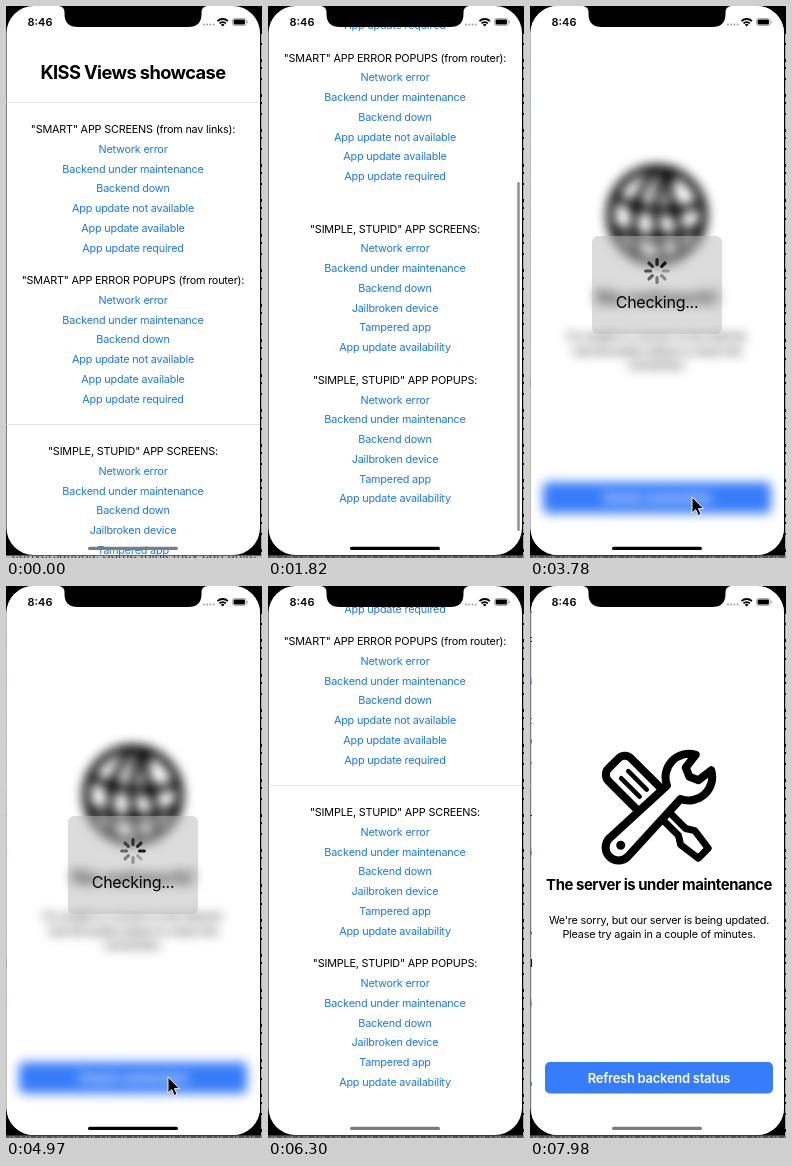
Animation of 256x552 px, one loop 8 s. Source, as an HTML page:

```html
<!DOCTYPE html>
<html lang="en">
<head>
<meta charset="utf-8">
<title>Views showcase</title>
<style>
html, body { margin: 0; width: 100%; height: 100%; overflow: hidden; background: #000; }
svg { display: block; width: 256px; height: 552px; }
text { font: 10.83px Inter, "Liberation Sans", sans-serif; letter-spacing: -.19px; text-anchor: middle; }
.link { fill: #1a78e2; }
.title { font-size: 18.3px; font-weight: 700; letter-spacing: -.6px; }
.big { font-size: 22px; font-weight: 700; letter-spacing: -.85px; }
.mid { font-size: 14.9px; font-weight: 700; letter-spacing: -.43px; }
.button { font-size: 13px; font-weight: 600; letter-spacing: -.27px; fill: #fff; }
.hud { font-size: 16px; letter-spacing: -.25px; }
.clock { font-size: 11px; font-weight: 600; letter-spacing: 0; }
.behind { font-size: 13px; fill: #444; }
.ink { fill: none; stroke: #000; stroke-width: 7.2; }
.tool { fill: #fff; stroke: #000; stroke-width: 8; stroke-linejoin: round; }
</style>
</head>
<body>
<svg viewBox="0 0 256 552">
  <defs>
    <clipPath id="screenClip"><rect x=".5" width="253.5" height="549" rx="27"/></clipPath>
    <clipPath id="globeClip"><circle cx="127" cy="209" r="48"/></clipPath>
    <clipPath id="stripClip"><rect y="549.5" width="256" height="3"/></clipPath>
    <filter id="blur" filterUnits="userSpaceOnUse" x="-20" y="120" width="300" height="420" color-interpolation-filters="sRGB">
      <feGaussianBlur id="blurAmount" stdDeviation="0"/>
    </filter>
  </defs>

  <rect width="256" height="552"/>
  <path d="M255.5 28V552" stroke="#aaa" stroke-dasharray="9 2 14 3 5 2"/>
  <g clip-path="url(#stripClip)">
    <rect id="strip" y="549" width="256" height="3"/>
    <text id="behind" class="behind" x="128" y="553">conversations. Some think they can unite</text>
    <path id="specks" d="M0 551H256" stroke="#333" stroke-dasharray="3 2 1 3 5 2"/>
  </g>

  <g clip-path="url(#screenClip)">
    <rect width="256" height="552" fill="#fff"/>
    <g id="list"><g id="dividers" stroke="#e6e6e8"><path d="M0 96.5H256M0 418.5H256"/></g></g>
    <rect id="bar" x="249.3" width="2.4" height="349" rx="1.2" fill="#8a8a8a"/>
    <rect id="dim" width="256" height="552"/>

    <g id="network">
      <rect width="256" height="552" fill="#fff"/>
      <g id="networkBody">
        <g clip-path="url(#globeClip)">
          <g class="ink" transform="translate(-6.5 0)">
            <path d="M84 184Q98 197 113 200Q132 206 151 204Q168 203 184 194"/>
            <path d="M84 219Q110 233 135 232Q162 231 182 217"/>
            <path d="M139 160Q118 176 113 200Q106 232 119 260"/>
            <path d="M146 160Q126 192 135 232Q137 246 142 260"/>
            <path d="M150 160Q142 184 151 204Q160 228 153 258"/>
          </g>
          <circle cx="106.5" cy="200" r="8"/>
          <circle cx="144.5" cy="204" r="8"/>
          <circle cx="128.5" cy="232" r="8"/>
        </g>
        <circle class="ink" cx="127" cy="209" r="46.5" style="stroke-width:8"/>
        <text class="big" x="127" y="299">No network!</text>
        <text x="127" y="334">I'm unable to connect to the Internet.</text>
        <text x="127" y="349">Use the button below to check the</text>
        <text x="127" y="363">connection.</text>
        <rect x="13" y="476" width="228" height="31.5" rx="5" fill="#377cf8"/>
        <text class="button" x="127" y="496.5">Check connection</text>
      </g>
      <g id="hud">
        <rect x="62" y="230" width="130" height="98" rx="6" fill="#b9b9b9" fill-opacity=".5"/>
        <g id="spinner" stroke="#111" stroke-width="3.2" stroke-linecap="round"/>
        <text class="hud" x="127" y="302">Checking...</text>
      </g>
    </g>

    <g id="service">
      <rect width="256" height="552" fill="#fff"/>
      <g transform="translate(126 222) rotate(45)">
        <path class="tool" d="M2-5H34L42-10L64-7V7L42 10L34 5H2Z" style="stroke-width:7"/>
        <rect class="tool" x="-63" y="-16" width="60" height="32" rx="9"/>
        <path d="M-47-5H-21M-47 5H-21" stroke="#000" stroke-width="4.6" stroke-linecap="round"/>
      </g>
      <g transform="translate(125.5 222.5) rotate(-45)">
        <path class="tool" d="M-55-13L23-9.6A23.500 23.500 0 0 1 65-11L49-9L45 0L49 9L65 11A23.500 23.500 0 0 1 23 9.6L-55 13A13 13 0 0 1-55-13Z"/>
        <circle cx="-52" r="4.5"/>
      </g>
      <text class="mid" x="127" y="304">The server is under maintenance</text>
      <text x="127" y="337.5">We're sorry, but our server is being updated.</text>
      <text x="127" y="352">Please try again in a couple of minutes.</text>
      <rect x="13" y="476" width="228" height="31.5" rx="5" fill="#377cf8"/>
      <text class="button" x="127" y="496.5">Refresh backend status</text>
    </g>

    <path d="M53 0Q58.500 1 58.500 6V8Q58.500 21 72 21H182Q195.500 21 195.500 8V6Q195.500 1 201 0Z"/>
    <text class="clock" x="34" y="20">8:46</text>
    <path d="M198 18.500H208" stroke="#999" stroke-width="1.800" stroke-linecap="round" stroke-dasharray="0 3.200"/>
    <g fill="none" stroke="#000" stroke-width="1.800">
      <path d="M211.500 15.200A7.300 7.300 0 0 1 221.900 15.200M213.500 17.400A4.500 4.500 0 0 1 219.900 17.400"/>
    </g>
    <path d="M216.700 20.500L214.900 18.700A2.500 2.500 0 0 1 218.500 18.700Z"/>
    <rect x="226.500" y="12.500" width="13.500" height="7" rx="2" fill="none" stroke="#999" stroke-width=".8"/>
    <rect x="227.600" y="13.600" width="11.300" height="4.800" rx="1"/>
    <path d="M241.200 14.800V17.200" stroke="#999" stroke-width="1"/>
    <rect id="home" x="82" y="540.800" width="90" height="3.200" rx="1.600"/>
  </g>

  <circle id="ring" r="13.500" fill="none" stroke="#222" stroke-width="1.500"/>
  <path id="cursor" transform="translate(162 491)" d="M0 0V16L3.700 12.600L6.300 18.500L9 17.300L6.400 11.600H11.500Z" stroke="#fff" stroke-width=".9"/>
</svg>

<script>
const LOOP = 8000, WIDTH = 254, STEP = 19.75, SCROLL_END = 219;
const PUSH = 2470, POP = 5658, PUSH_AGAIN = 7562;
const NS = "http://www.w3.org/2000/svg";
const $ = id => document.getElementById(id);
const set = (id, name, value) => $(id).setAttribute(name, value);
const show = (id, on) => set(id, "opacity", +on);
const clamp = x => Math.min(1, Math.max(0, x));
const ramp = (t, from, to) => clamp((t - from) / (to - from));
const within = (t, from, to) => t >= from && t < to;
const smooth = x => x * x * (3 - 2 * x);

// Remaining share of a critically damped spring.
const spring = (ms, rate = .0165) => ms <= 0 ? 1 : (1 + rate * ms) * Math.exp(-rate * ms);

function add(parent, tag, attrs, text = "") {
  const node = document.createElementNS(NS, tag);
  for (const key in attrs) node.setAttribute(key, attrs[key]);
  node.textContent = text;
  $(parent).append(node);
  return node;
}

function addGroup(y, heading, links) {
  add("list", "text", { x: 127, y: y + 4 }, heading);
  links.forEach((link, i) =>
    add("list", "text", { class: "link", x: 127, y: y + 23.9 + i * STEP }, link));
}

const common = ["Network error", "Backend under maintenance", "Backend down"];
const smart = [...common, "App update not available", "App update available", "App update required"];
const simple = [...common, "Jailbroken device", "Tampered app", "App update availability"];
add("list", "text", { class: "title", x: 127, y: 72.5 }, "KISS Views showcase");
addGroup(123, '"SMART" APP SCREENS (from nav links):', smart);
addGroup(274, '"SMART" APP ERROR POPUPS (from router):', smart);
addGroup(445, '"SIMPLE, STUPID" APP SCREENS:', simple);
addGroup(596.2, '"SIMPLE, STUPID" APP POPUPS:', simple);

const spokes = Array.from({ length: 8 }, (_, i) =>
  add("spinner", "path", { d: "M0-6.5V-11.3", transform: `translate(127 265) rotate(${i * 45})` }));

const taps = [
  { from: 2380, to: 2520, x: 135.5, y: 248 },
  { from: 3290, to: 3430, x: 164, y: 493 },
  { from: 7490, to: 7562, x: 135.5, y: 267 }
];

function scrollAt(t) {
  if (t < 1620) return 232 * smooth(ramp(t, 1190, 1620));
  return SCROLL_END + 13 * spring(t - 1620, .013);
}

function drawList(t, cover) {
  const scroll = t < 2200 ? scrollAt(t) : SCROLL_END;
  set("list", "transform", `translate(${-.3 * WIDTH * cover} ${-scroll})`);
  show("dividers", !within(t, 1260, 2520));
  set("bar", "y", 27 + 149 * Math.min(1, scroll / SCROLL_END));
  show("bar", ramp(t, 1190, 1260) * (1 - ramp(t, 2030, 2100)));
  set("dim", "opacity", .1 * Math.sqrt(cover));
}

function drawHud(t) {
  const fade = ramp(t, 3400, 3680);
  set("blurAmount", "stdDeviation", 5.5 * fade);
  if (fade) set("networkBody", "filter", "url(#blur)");
  else $("networkBody").removeAttribute("filter");
  show("hud", fade * (1 - ramp(t, 5300, 5620)));
  const head = (t - 3780) / 125 + 81;
  spokes.forEach((spoke, i) =>
    spoke.setAttribute("opacity", 1 - .8 * ((head - i + 80) % 8) / 8));
}

function draw(t) {
  const away = t < POP ? spring(t - PUSH) : 1 - spring(t - POP);
  const awayAgain = spring(t - PUSH_AGAIN);
  drawList(t, 1 - Math.min(away, awayAgain));
  drawHud(t);
  set("network", "transform", `translate(${away * WIDTH} 0)`);
  set("service", "transform", `translate(${awayAgain * WIDTH} 0)`);

  const grey = Math.round(125 * (1 - ramp(t, 840, 1050) + ramp(t, POP, POP + 80)));
  set("home", "fill", `rgb(${grey},${grey},${grey})`);

  const early = t < 840;
  set("strip", "fill", early ? "#bbb" : "#777");
  show("behind", early);
  show("specks", !early);

  const tap = taps.find(p => within(t, p.from, p.to));
  show("ring", !!tap);
  if (tap) set("ring", "transform", `translate(${tap.x} ${tap.y})`);
  show("cursor", within(t, 3430, 6300));
}

const start = performance.now();
function tick() {
  draw((performance.now() - start) % LOOP);
  requestAnimationFrame(tick);
}
tick();
</script>
</body>
</html>
```
